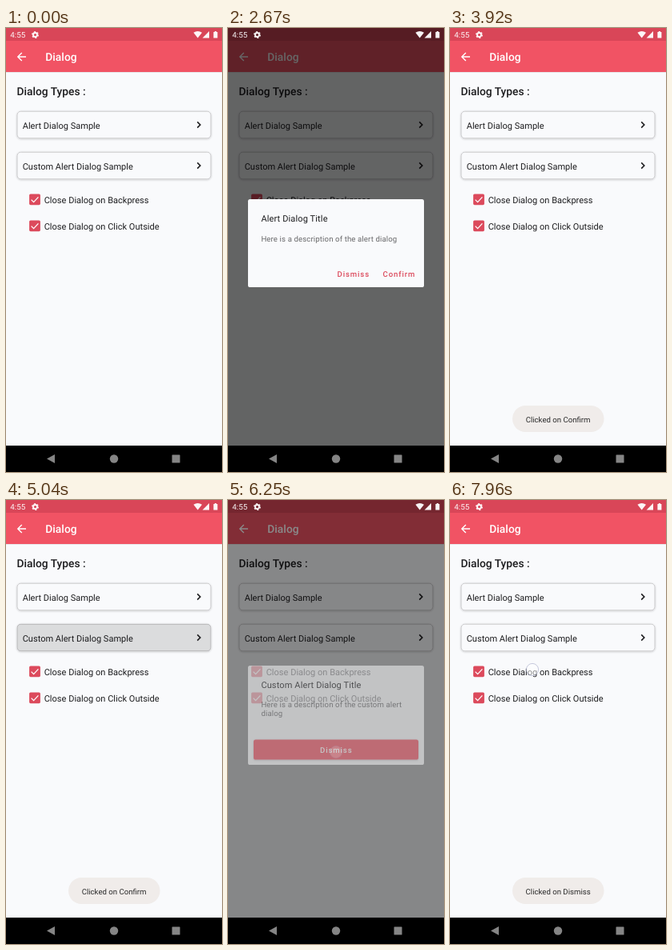
Recreate the animation shown at these times as an HTML page. Size 270 by 555 pixels, loop 8 s.

```html
<!DOCTYPE html>
<html lang="en">
<head>
<meta charset="utf-8">
<title>Dialog</title>
<style>
html, body { margin: 0; height: 100%; overflow: hidden; background: #000; }
svg { display: block; width: 100vw; height: 100vh; font-family: Roboto, sans-serif; }
text { white-space: pre; text-rendering: geometricPrecision; }
.h6 { font-size: 13.75px; font-weight: 500; letter-spacing: .03px; }
.body1 { font-size: 11px; letter-spacing: .02px; fill: #1c1c1e; }
.title { font-size: 11px; letter-spacing: .13px; fill: #1c1c1e; }
.body2 { font-size: 9.625px; letter-spacing: .12px; fill: #69696b; }
.btn { font-size: 9.625px; font-weight: 500; letter-spacing: .86px; fill: #dc4a5c; }
.line { fill: none; stroke: #fff; }
.scale { transform-box: fill-box; transform-origin: center; }
</style>
</head>
<body>
<svg viewBox="0 0 270 555">
  <defs>
    <filter id="shade" x="-5%" y="-20%" width="110%" height="150%">
      <feDropShadow dx="0" dy=".7" stdDeviation=".8" flood-opacity=".22"/>
    </filter>
    <clipPath id="clip1"><rect x="14" y="104" width="242" height="34" rx="4.5"/></clipPath>
    <clipPath id="clip2"><rect x="14" y="155" width="242" height="34" rx="4.5"/></clipPath>
    <g id="card">
      <rect x="14" y="104.2" width="242" height="33.6" rx="4.5" fill="#f9fafc" stroke="#c9c9cb" filter="url(#shade)"/>
    </g>
    <path id="chevron" d="M239.2 117.4l3.6 3.6-3.6 3.6" fill="none" stroke="#1c1c1e" stroke-width="1.6"/>
    <g id="check">
      <rect x="29.1" y="207.4" width="13.8" height="13.8" rx="1.6" fill="#dc4a5c"/>
      <path class="line" stroke-width="1.3" d="M31.6 214.6l3 3 5.8-6.2"/>
    </g>
  </defs>

  <rect width="270" height="522" fill="#f9fafc"/>
  <rect y="55" width="270" height="1" fill="#000" opacity=".07"/>
  <rect width="270" height="55" fill="#f15364"/>
  <rect width="270" height="16" fill="#d94658"/>
  <path class="line" stroke-width="1.4" d="M25 36H14.8M19.8 31l-5 5 5 5"/>
  <text class="h6" x="49.3" y="41.2" fill="#fff">Dialog</text>
  <text class="h6" x="13.4" y="83.6" fill="#1c1c1e">Dialog Types :</text>

  <use href="#card"/>
  <use href="#card" y="51"/>
  <g clip-path="url(#clip1)"><circle id="ripple1" cx="157" cy="122"/></g>
  <g clip-path="url(#clip2)"><circle id="ripple2" cx="150" cy="172"/></g>
  <use href="#chevron"/>
  <use href="#chevron" y="51"/>
  <text class="body1" x="20.7" y="125.5">Alert Dialog Sample</text>
  <text class="body1" x="20.7" y="176.5">Custom Alert Dialog Sample</text>

  <use href="#check"/>
  <use href="#check" y="33"/>
  <text class="body1" x="47.7" y="218.5">Close Dialog on Backpress</text>
  <text class="body1" x="47.7" y="251.5">Close Dialog on Click Outside</text>

  <rect id="scrim" width="270" height="522"/>

  <g id="dialog1" class="scale">
    <rect x="25" y="214" width="220" height="110" rx="2.6" fill="#f9fafc"/>
    <text class="title" x="41.4" y="242">Alert Dialog Title</text>
    <text class="body2" x="41.4" y="266.5">Here is a description of the alert dialog</text>
    <text class="btn" x="136.5" y="310.5">Dismiss</text>
    <text class="btn" x="193.6" y="310.5">Confirm</text>
  </g>
  <g id="dialog2" class="scale">
    <rect x="25" y="207" width="220" height="124" rx="2.6" fill="#f9fafc"/>
    <text class="title" x="41.4" y="235">Custom Alert Dialog Title</text>
    <text class="body2" x="41.4" y="259.4">Here is a description of the custom alert</text>
    <text class="body2" x="41.4" y="270.4">dialog</text>
    <rect x="32" y="299.5" width="206" height="25" rx="2.6" fill="#f15364" filter="url(#shade)"/>
    <text class="btn" x="115" y="315.6" style="fill:#fff">Dismiss</text>
  </g>

  <g id="toast">
    <rect x="78" y="472" width="114.5" height="33" rx="16.5" fill="#f0ecea"/>
    <text id="message" x="135.1" y="492.5" text-anchor="middle" font-size="9.625" fill="#2a2a2a"></text>
  </g>

  <g fill="#fff" opacity=".95">
    <text x="5.3" y="12" font-size="9.8">4:55</text>
    <g fill="none" stroke="#fff">
      <circle cx="36.5" cy="8.5" r="2.5" stroke-width="1.9"/>
      <circle cx="36.5" cy="8.5" r="3.8" stroke-width="1.3" stroke-dasharray="2 1.98"/>
    </g>
    <path d="M239.7 12.4L234.4 5.8Q239.7 2.2 245 5.8Z"/>
    <path d="M254 4v8.4h-8.4z"/>
    <path d="M259.4 5h1.4V4h2.2v1h1.4v7.6h-5z"/>
  </g>

  <rect y="522" width="270" height="33"/>
  <g fill="#858585">
    <path d="M61 533v11l-10-5.5z"/>
    <circle cx="135" cy="538.5" r="5.2"/>
    <rect x="207.5" y="533.5" width="10" height="10" rx=".6"/>
  </g>
  <circle id="spot" r="7.6" fill="#fff" fill-opacity=".5" stroke="#a3a9c8" stroke-opacity=".6"/>
</svg>
<script>
const LOOP = 8000;
const el = id => document.getElementById(id);
const ramp = (t, from, to) => Math.min(1, Math.max(0, (t - from) / (to - from)));
const easeOut = p => 1 - (1 - p) ** 3;

// x, y, press time, release time
const taps = [
  [157, 122, 1630, 1740],
  [215, 303, 3090, 3545],
  [150, 172, 4670, 4780],
  [135, 315, 6130, 6145],
  [103, 212, 7920, 9000]
];

function ripple(id, t, start, end) {
  const c = el(id);
  c.setAttribute('r', 10 + 160 * easeOut(ramp(t, start, start + 300)));
  c.setAttribute('opacity', .12 * ramp(t, start, start + 75) * (1 - ramp(t, end, end + 150)));
}

// Shows a dialog and returns how much it dims the page
function dialog(id, t, open, close) {
  const enter = easeOut(ramp(t, open, open + 210));
  const stay = 1 - ramp(t, close, close + 200);
  el(id).style.opacity = enter * stay ** 2.5;
  el(id).style.transform = `scale(${.9 + .1 * enter})`;
  return ramp(t, open, open + 210) * stay;
}

function spot(t) {
  const tap = taps.find(([, , down, up]) => t >= down && t < up + 200);
  const s = el('spot');
  s.setAttribute('opacity', tap ? (1 - ramp(t, tap[3], tap[3] + 200)) ** 1.5 : 0);
  if (tap) s.setAttribute('transform', `translate(${tap[0]} ${tap[1]})`);
}

function draw(t) {
  ripple('ripple1', t, 1660, 2130);
  ripple('ripple2', t, 4700, 5170);
  const dim = dialog('dialog1', t, 2130, 3545) + dialog('dialog2', t, 5170, 6205);
  el('scrim').setAttribute('opacity', .6 * dim);
  const first = ramp(t, 3660, 3880) * (1 - ramp(t, 5620, 5900));
  el('toast').setAttribute('opacity', first + ramp(t, 6340, 6600));
  el('message').textContent = 'Clicked on ' + (t < 6100 ? 'Confirm' : 'Dismiss');
  spot(t);
}

const begin = performance.now();
function tick() {
  draw((performance.now() - begin) % LOOP);
  requestAnimationFrame(tick);
}
tick();
</script>
</body>
</html>
```
